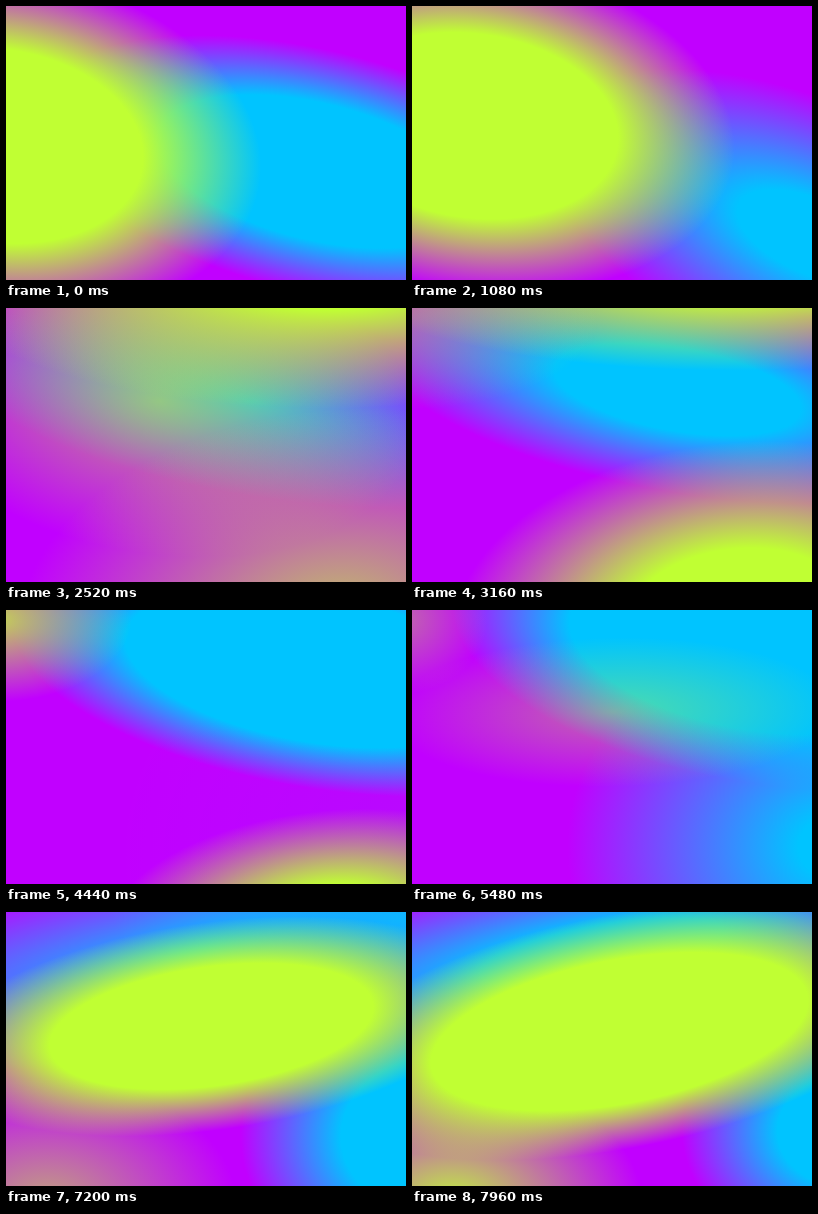
Write an HTML page with a canvas that moves like this. It is 400 px wide and 274 px high and loops after 8000 ms.

```html
<!DOCTYPE html>
<html lang="en">
<head>
<meta charset="utf-8">
<title>Drifting colours</title>
<style>
  html, body { margin: 0; width: 100%; height: 100%; overflow: hidden; background: #c100ff; }
  canvas { display: block; width: 100%; height: 100%; }
</style>
</head>
<body>
<canvas id="stage" width="400" height="274"></canvas>
<script>
const LOOP = 8000, STEP = 40;
const PURPLE = 'rgb(193 0 255)', CYAN = '0 196 255', LIME = '192 255 51';

// A soft ellipse drifts, resizes and turns evenly over its life,
// while its strength swells from nothing to the peak and back.
const clouds = [
  { color: CYAN, life: [-1500, 1750], peak: 2.3,
    at: [[185, 75], [456, 271]], radii: [[290, 105], [285, 140]], tilt: [0, 30] },
  { color: CYAN, life: [1900, 7800], peak: 2.7,
    at: [[225, 105], [415, -5]], radii: [[310, 85], [300, 165]], tilt: [10, 10] },
  { color: CYAN, life: [4400, 9900], peak: 2,
    at: [[415, 245], [455, 205]], radii: [[310, 270], [95, 55]], tilt: [0, 0] },
  { color: CYAN, life: [6300, 9700], peak: 1.4,
    at: [[190, 40], [190, 40]], radii: [[430, 95], [430, 95]], tilt: [-10, -10] },

  { color: LIME, life: [-1800, 2900], peak: 2.4,
    at: [[-126, 173], [178, 86]], radii: [[270, 190], [260, 150]], tilt: [8, 8] },
  { color: LIME, life: [1300, 4400], peak: 1.45,
    at: [[310, -38], [340, -30]], radii: [[400, 210], [400, 20]], tilt: [0, 0] },
  { color: LIME, life: [2100, 5300], peak: 1.9,
    at: [[330, 310], [320, 305]], radii: [[340, 230], [180, 60]], tilt: [-6, -6] },
  { color: LIME, life: [2700, 6000], peak: .85,
    at: [[-10, 10], [-10, 10]], radii: [[220, 95], [60, 70]], tilt: [0, 0] },
  { color: LIME, life: [5200, 10800], peak: 2.6,
    at: [[200, 100], [215, 140]], radii: [[215, 70], [410, 165]], tilt: [0, -22] },
  { color: LIME, life: [6500, 9500], peak: .95,
    at: [[40, 290], [40, 290]], radii: [[190, 125], [190, 125]], tilt: [0, 0] }
];

const ctx = document.getElementById('stage').getContext('2d');
const { width, height } = ctx.canvas;
const mix = ([a, b], t) => a + (b - a) * t;
const mixPoint = ([a, b], t) => a.map((v, i) => mix([v, b[i]], t));

// Strength above 1 leaves a solid core; below 1 the centre stays see-through.
function softDisc(color, strength) {
  const fill = ctx.createRadialGradient(0, 0, 0, 0, 0, 1);
  fill.addColorStop(Math.max(0, 1 - 1 / strength), `rgb(${color} / ${Math.min(1, strength)})`);
  fill.addColorStop(1, `rgb(${color} / 0)`);
  return fill;
}

function drawCloud({ color, life: [born, gone], peak, at, radii, tilt }, time) {
  const age = (time - born) / (gone - born);
  if (age <= 0 || age >= 1) return;
  ctx.save();
  ctx.translate(...mixPoint(at, age));
  ctx.rotate(mix(tilt, age) * Math.PI / 180);
  ctx.scale(...mixPoint(radii, age));
  ctx.fillStyle = softDisc(color, peak * Math.sin(Math.PI * age));
  ctx.beginPath();
  ctx.arc(0, 0, 1, 0, 2 * Math.PI);
  ctx.fill();
  ctx.restore();
}

function draw(time) {
  ctx.fillStyle = PURPLE;
  ctx.fillRect(0, 0, width, height);
  for (const cloud of clouds) drawCloud(cloud, time);
}

const start = performance.now();
function tick() {
  const elapsed = (performance.now() - start) % LOOP;
  draw(Math.floor(elapsed / STEP) * STEP);
  requestAnimationFrame(tick);
}
tick();
</script>
</body>
</html>
```
